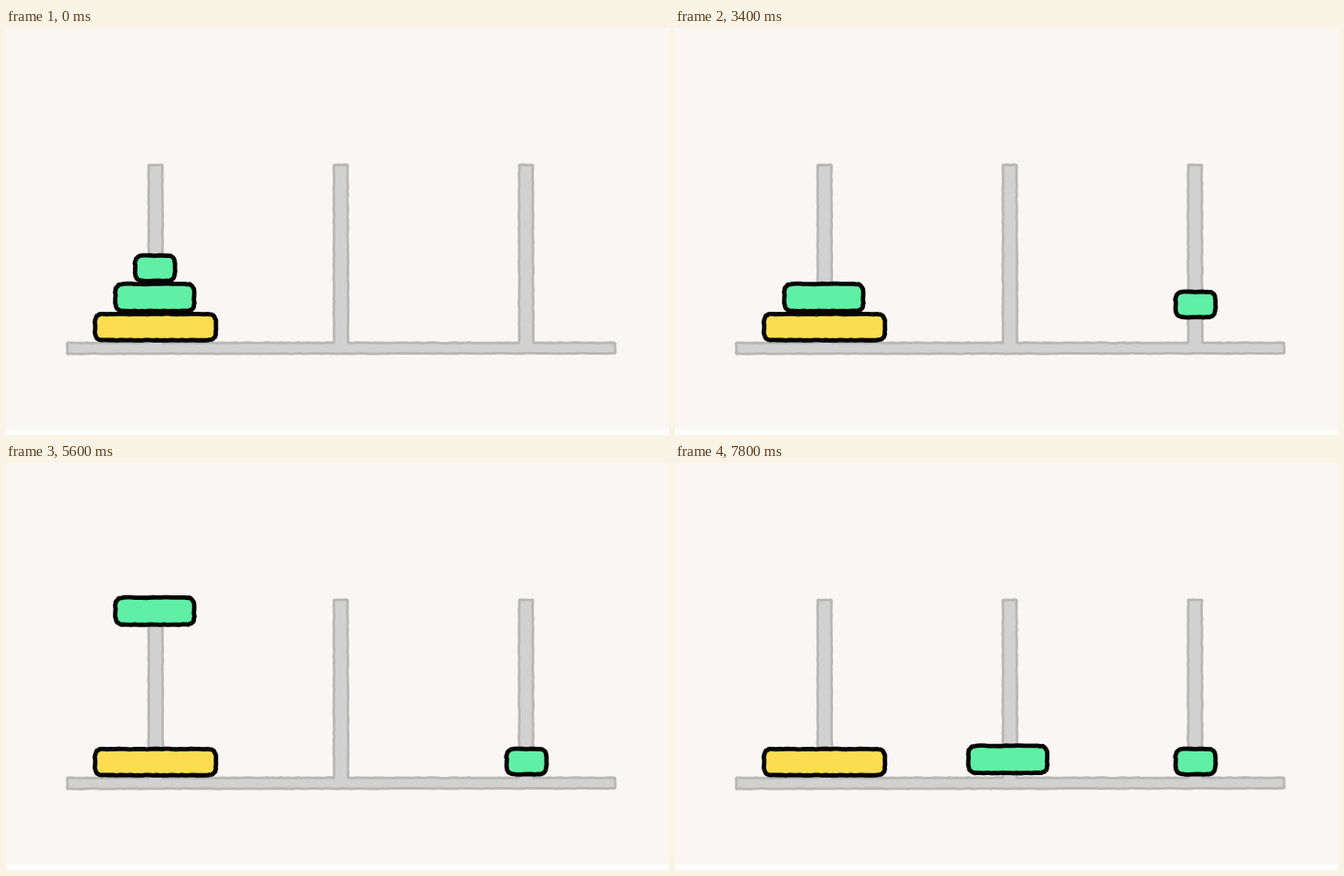
An HTML page with a canvas that plays this animation: 726 by 446 pixels, repeating every 8 s.

```html
<!DOCTYPE html>
<html lang="en">
<head>
<meta charset="utf-8">
<title>Moving discs between pegs</title>
<style>
html, body { margin: 0; width: 100%; height: 100%; overflow: hidden; background: #faf6f3; }
canvas { display: block; width: 726px; height: 446px; }
</style>
</head>
<body>
<canvas id="stage" width="726" height="446"></canvas>
<script>
const ctx = document.getElementById('stage').getContext('2d');
const LOOP = 8000, STEP = 200;      // ms
const TRAVEL = 4.2;                 // seconds one disc needs for its move
const SHOULDER = 133;               // height where a move leaves the vertical
const PEN = 4.8;
const GREEN = '#5ff0a6', YELLOW = '#fcdd52';

function seeded(seed) {
  return () => (seed = (seed * 16807) % 2147483647) / 2147483647 - 0.5;
}

const mix = (a, b, u) => a + (b - a) * u;
const gap = (a, b) => Math.hypot(b[0] - a[0], b[1] - a[1]);
const between = (a, b, u) => [mix(a[0], b[0], u), mix(a[1], b[1], u)];

// Closed polygon with rounded corners and a slightly shaky line.
function roughShape(corners, radius, seed, shake) {
  const rand = seeded(seed), path = new Path2D(), n = corners.length;
  const add = ([x, y]) => path.lineTo(x + rand() * shake, y + rand() * shake);
  corners.forEach((c, i) => {
    const prev = corners[(i + n - 1) % n], next = corners[(i + 1) % n];
    const a = between(c, prev, radius / gap(c, prev));
    const b = between(c, next, radius / gap(c, next));
    const end = between(next, c, radius / gap(c, next));
    for (let u = 0; u <= 1; u += 0.125) {
      add(between(between(a, c, u), between(c, b, u), u));
    }
    for (let d = 4; d < gap(b, end); d += 4) add(between(b, end, d / gap(b, end)));
  });
  path.closePath();
  return path;
}

function makeRack() {
  const corners = [[67, 345]];
  for (let i = 0; i < 3; i++) {
    const x = 163.8 + i * 202.8;
    corners.push([x - 7.5, 345], [x - 7.5, 150], [x + 7.4, 150], [x + 8, 345]);
  }
  corners.push([667, 345], [667, 356.5], [67, 357]);
  return roughShape(corners, 1, 17, 0.6);
}

// Outline of a disc, hung from the middle of its top edge.
function makeDisc(width, height, seed) {
  const x = width / 2 - PEN / 2, top = PEN / 2, bottom = height - PEN / 2;
  return roughShape([[-x, top], [x, top], [x, bottom], [-x, bottom]], 9, seed, 0.8);
}

// Straight up, over in one curve, straight down.
function makeRoute(x0, y0, x1, y1, reach) {
  const points = [[x0, y0]];
  for (let i = 0; i <= 60; i++) {
    const u = i / 60;
    points.push([mix(x0, x1, u * u * (3 - 2 * u)), SHOULDER - reach * 3 * u * (1 - u)]);
  }
  points.push([x1, y1]);
  return points;
}

function pointAlong(route, share) {
  const lengths = route.slice(1).map((p, i) => gap(route[i], p));
  let left = share * lengths.reduce((a, b) => a + b);
  let i = 0;
  while (i < lengths.length - 1 && left > lengths[i]) left -= lengths[i++];
  return between(route[i], route[i + 1], left / lengths[i]);
}

function easeInOut(u) {
  u = Math.min(1, Math.max(0, u));
  return u < 0.5 ? 4 * u ** 3 : 1 - 4 * (1 - u) ** 3;
}

const rack = makeRack();
const large = makeDisc(137, 33.5, 59);
const movers = [
  { shape: makeDisc(91, 34.5, 47), start: 4.02, route: makeRoute(163, 278, 364.5, 310, 120) },
  { shape: makeDisc(48.5, 32.5, 31), start: 0.03, route: makeRoute(163.2, 247, 570, 311, 132) }
];

function paint(path, fill, stroke, width) {
  ctx.fillStyle = fill;
  ctx.strokeStyle = stroke;
  ctx.lineWidth = width;
  ctx.fill(path);
  ctx.stroke(path);
}

function drawDisc(path, [x, y], fill) {
  ctx.save();
  ctx.translate(x, y);
  paint(path, fill, '#050505', PEN);
  ctx.restore();
}

function draw(t) {
  ctx.fillStyle = '#faf6f3';
  ctx.fillRect(0, 0, 726, 440);
  ctx.fillStyle = '#fefefe';
  ctx.fillRect(0, 440, 726, 6);
  ctx.lineJoin = 'round';
  paint(rack, '#d2d1d2', '#b7b7b6', 2.8);
  drawDisc(large, [163.6, 311], YELLOW);
  for (const m of movers) {
    drawDisc(m.shape, pointAlong(m.route, easeInOut((t - m.start) / TRAVEL)), GREEN);
  }
}

const begin = performance.now();
function tick() {
  const ms = (performance.now() - begin) % LOOP;
  draw(Math.floor(ms / STEP) * STEP / 1000);
  requestAnimationFrame(tick);
}
tick();
</script>
</body>
</html>
```
